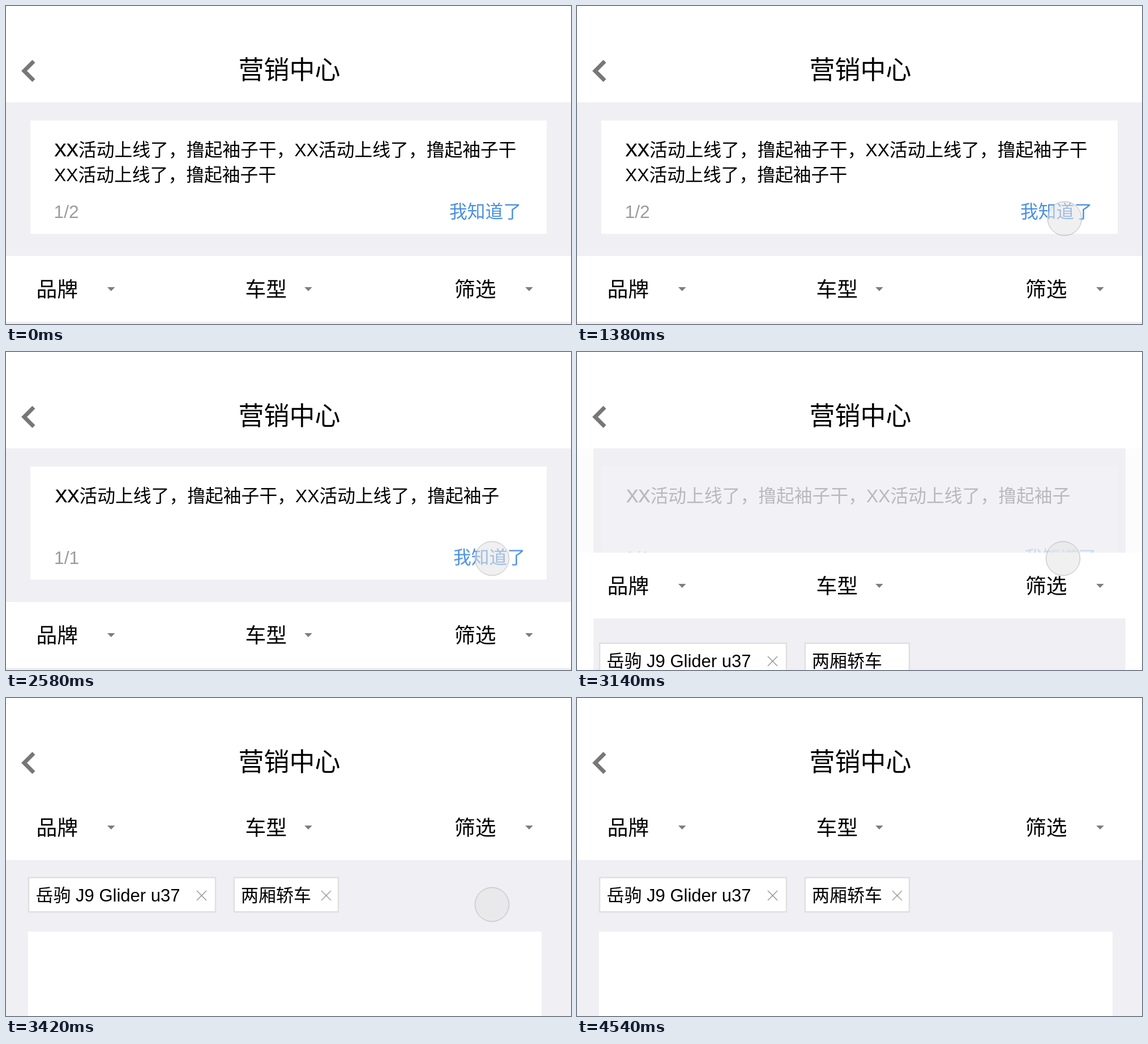
An HTML page for the animation above (5380 ms loop, 998 by 561 pixels).

```html
<!DOCTYPE html>
<html lang="zh-CN">
<head>
<meta charset="utf-8">
<title>营销中心</title>
<style>
  html, body { margin: 0; width: 100%; height: 100%; overflow: hidden; background: #fff; }
  svg { display: block; width: 998px; height: 561px; }
  text { font: 31.8px "Liberation Sans", "Noto Sans CJK SC", "Noto Sans CJK", sans-serif; white-space: pre; }
  .title { font-size: 45px; }
  .bar text { font-size: 36.8px; }
  .chips text { font-size: 31px; }
  .lead { stroke: #000; stroke-width: .5px; }
  .page { fill: #9b9b9b; }
  .link { fill: #4a90e2; }
  .grey { fill: #efeff4; }
  .white { fill: #fff; }
  .chip { fill: #fff; stroke: #e0e0e1; stroke-width: 2.5px; }
  .cross { stroke: #8a8a8a; stroke-width: 1.2px; }
  .arrow { fill: #7d7d7d; }

  .leave, .settle, .rise, .sheet, .notice, .late, .cursor {
    animation: 5.38s ease infinite;
  }
  .leave { animation-name: leave; }
  .settle { animation-name: settle; }
  .rise { animation-name: rise; }
  .sheet { animation-name: widen; transform-origin: 499px 0; }
  .notice { animation-name: fade; }
  .late { animation-name: appear; animation-timing-function: step-end; }
  .cursor { animation-name: point; animation-timing-function: ease-in-out; }

  /* first notice slides up under the header */
  @keyframes leave {
    0%, 36.38% { transform: translate(0, 0); }
    41.95%, 100% { transform: translate(var(--dx), var(--dy)); }
  }
  @keyframes settle {
    0%, 36.38% { transform: translate(0, 9.4px); }
    41.95%, 100% { transform: translate(0, 0); }
  }
  /* notice closes, the list moves up */
  @keyframes rise {
    0%, 57.01% { transform: translate(0, var(--from)); }
    63.51%, 100% { transform: translate(0, 0); }
  }
  @keyframes widen {
    0%, 57.01% { transform: scaleX(.914); }
    63.51%, 100% { transform: scaleX(1); }
  }
  @keyframes fade {
    0%, 57.01% { opacity: 1; }
    59.9%, 100% { opacity: 0; }
  }
  @keyframes appear {
    0% { opacity: 0; }
    62.1%, 100% { opacity: 1; }
  }
  @keyframes point {
    0%, 14.6% { transform: translate(942px, -32px); }
    24.16%, 25.5% { transform: translate(861.3px, 375px); }
    29.37%, 32.2% { transform: translate(858.5px, 372px); }
    32.34%, 45.1% { transform: translate(858.5px, 371px); }
    47.96%, 68.6% { transform: translate(858.5px, 364.3px); }
    76.21% { transform: translate(919.5px, 351px); }
    81.2% { transform: translate(919.5px, 351px); animation-timing-function: ease-in; }
    84.3%, 100% { transform: translate(925.5px, -32px); }
  }
</style>
</head>
<body>
<svg viewBox="0 0 998 561">
  <defs>
    <path id="arrow" class="arrow" d="M-6.8 -3.5H6.8L0 3.5Z"/>
    <path id="cross" class="cross" d="M-8.5 -8.5L8.5 8.5M8.5 -8.5L-8.5 8.5"/>
  </defs>

  <rect class="grey sheet" y="170" width="998" height="391"/>

  <g class="notice">
    <rect class="grey" y="170" width="998" height="271.5"/>
    <rect y="557" width="998" height="4" fill="#efefef"/>

    <rect class="white" x="43" y="202" width="912" height="199.5"/>
    <text x="87" y="265"><tspan class="lead">XX</tspan>活动上线了，撸起袖子干，XX活动上线了，撸起袖子</text>
    <text class="page" x="85" y="374">1/1</text>
    <text class="link settle" x="790" y="374">我知道了</text>

    <rect class="white leave" style="--dx:-4px;--dy:-232px" x="43" y="202" width="912" height="199.5"/>
    <g class="leave" style="--dx:2px;--dy:-234px">
      <text x="85.5" y="265"><tspan class="lead">XX</tspan>活动上线了，撸起袖子干，XX活动上线了，撸起袖子干</text>
      <text x="85" y="309">XX活动上线了，撸起袖子干</text>
    </g>
    <text class="page leave" style="--dx:9px;--dy:-240px" x="84.5" y="374">1/2</text>
    <text class="link leave" style="--dx:-4px;--dy:-240px" x="783" y="374">我知道了</text>
  </g>

  <g class="chips rise" style="--from:290px">
    <rect class="chip" x="40" y="316.8" width="330" height="60.5"/>
    <text x="52.5" y="359">岳驹 J9 Glider u37</text>
    <use href="#cross" x="345.5" y="348.5"/>
    <rect class="chip" x="403" y="316.8" width="184" height="60.5"/>
    <text x="415" y="359">两厢轿车</text>
    <use class="late" href="#cross" x="565.5" y="348.5"/>
    <rect class="white" x="38.6" y="412" width="907.4" height="200"/>
  </g>

  <g class="bar rise" style="--from:271px">
    <rect class="white" y="170" width="998" height="116"/>
    <text x="53.5" y="242">品牌</text>
    <use href="#arrow" x="185.7" y="228.5"/>
    <text x="422.5" y="242">车型</text>
    <use href="#arrow" x="534" y="228.5"/>
    <text x="792" y="242">筛选</text>
    <use href="#arrow" x="924" y="228.5"/>
  </g>

  <rect class="white" width="998" height="170"/>
  <path d="M49 97.5L32 114.5L49 131.5" fill="none" stroke="#777" stroke-width="7"/>
  <text class="title" x="410.5" y="129">营销中心</text>

  <circle class="cursor" r="30" fill="rgba(228,228,228,.55)" stroke="#b4b4b4"/>
</svg>
</body>
</html>
```
